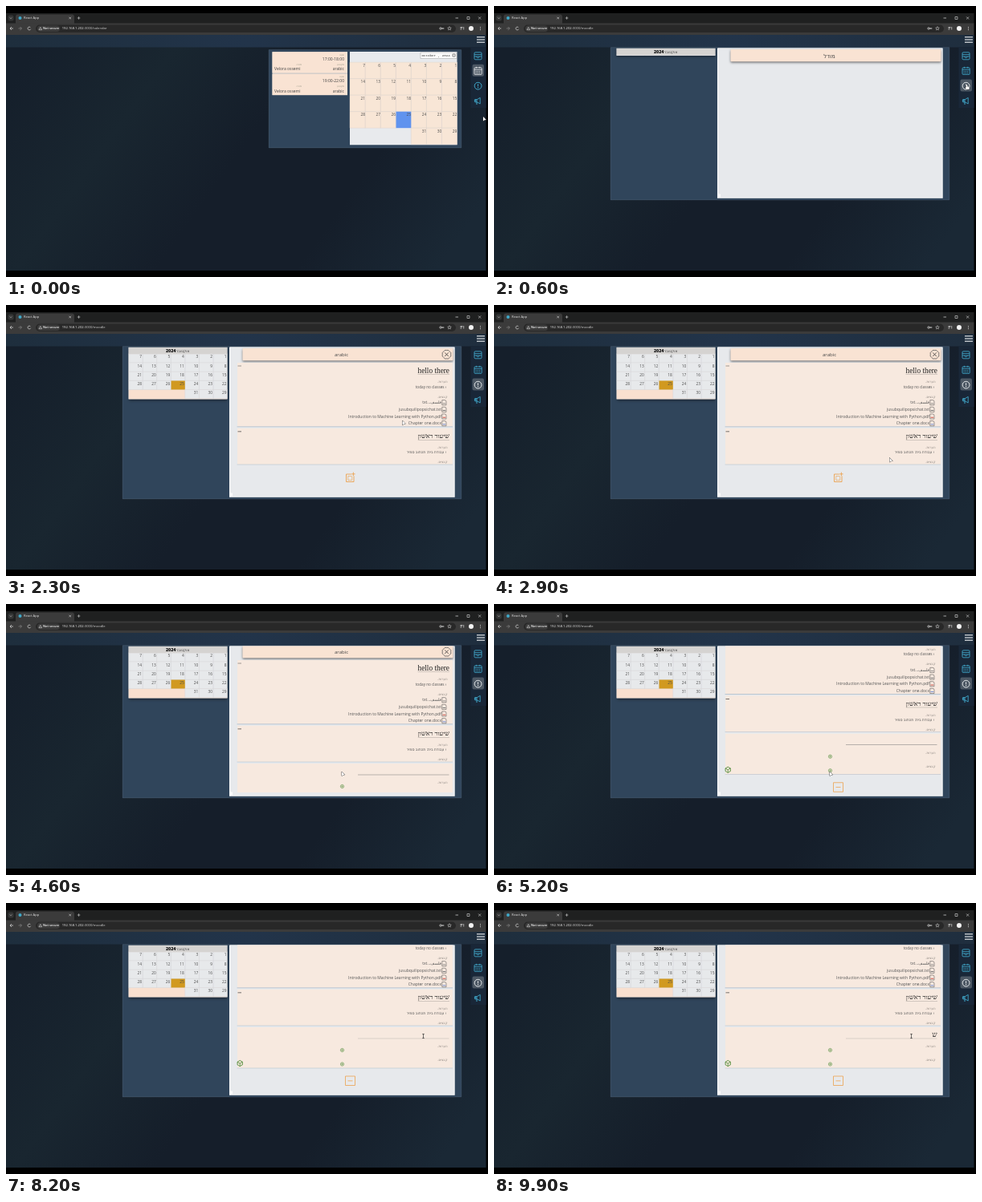
Write an HTML page with a canvas that moves like this. It is 600 px wide and 338 px high and loops after 10 s.

```html
<!DOCTYPE html>
<html lang="en">
<head>
<meta charset="utf-8">
<title>React App</title>
<style>
html, body { margin: 0; width: 100%; height: 100%; overflow: hidden; background: #000; }
canvas { display: block; width: 600px; height: 338px; }
</style>
</head>
<body>
<canvas id="stage"></canvas>
<script>
const W = 600, H = 338, LOOP = 10000, TAU = Math.PI * 2;
const canvas = document.getElementById('stage');
const ctx = canvas.getContext('2d');
const dpr = Math.max(1, window.devicePixelRatio || 1);
canvas.width = W * dpr;
canvas.height = H * dpr;

const SANS = '"Open Sans", "Noto Sans", "DejaVu Sans", sans-serif';
const SERIF = '"Liberation Serif", "Noto Serif", serif';
const MONO = '"Liberation Mono", "DejaVu Sans Mono", monospace';
const PERSON = 'Velora ossemi';
const INK = '#444', UI = '#ddd', RULE = '#a9bac9';
const PANEL = '#30455b', PANE = '#e7e9ec', PEACH = '#f9e3d3', CARD = '#f7e9df';
const CYAN = '#45b4d8', ORANGE = '#eda24e', GREEN = '#4c8a35';

// Times of the events
const OPEN_PAGE = 350, LOADED = 900, OPEN_COURSE = 1700, ADD = 3600, SCROLL = 4900, FOCUS = 6400, TYPE = 9000;

const ease = (t, from, time) => {
  const p = Math.min(1, Math.max(0, (t - from) / time));
  return p * p * (3 - 2 * p);
};

function rect(x, y, w, h, fill, r = 0) {
  ctx.fillStyle = fill;
  ctx.beginPath();
  ctx.roundRect(x, y, w, h, r);
  ctx.fill();
}

function stroke(color, lw) {
  ctx.strokeStyle = color;
  ctx.lineWidth = lw;
  ctx.stroke();
}

function box(x, y, w, h, color, lw = 0.8, r = 0) {
  ctx.beginPath();
  ctx.roundRect(x, y, w, h, r);
  stroke(color, lw);
}

const hline = (x, y, w, color, lw = 0.7) => rect(x, y - lw / 2, w, lw, color);
const vline = (x, y, h, color, lw = 0.7) => rect(x - lw / 2, y, lw, h, color);

function dot(x, y, r, color) {
  rect(x - r, y - r, 2 * r, 2 * r, color, r);
}

function ring(x, y, r, color, lw, from = 0, to = TAU) {
  ctx.beginPath();
  ctx.arc(x, y, r, from, to);
  stroke(color, lw);
}

// n spokes from the centre: crosses, plus signs and chevrons
function spokes(x, y, r, n, turn, color, lw = 0.6, step = TAU / n) {
  ctx.beginPath();
  for (let i = 0; i < n; i++) {
    const a = turn + i * step;
    ctx.moveTo(x, y);
    ctx.lineTo(x + r * Math.cos(a), y + r * Math.sin(a));
  }
  stroke(color, lw);
}

const plusSign = (x, y, r, color, lw) => spokes(x, y, r, 4, 0, color, lw);
const cross = (x, y, r, color, lw) => spokes(x, y, r, 4, TAU / 8, color, lw);

// Regular polygon; inner below 1 makes a star
function poly(x, y, r, n, turn, color, lw, inner = 1) {
  ctx.beginPath();
  for (let i = 0; i < 2 * n; i++) {
    const a = turn + i * Math.PI / n;
    const k = i % 2 ? inner * (inner < 1 ? 1 : Math.cos(Math.PI / n)) : 1;
    ctx.lineTo(x + r * k * Math.cos(a), y + r * k * Math.sin(a));
  }
  ctx.closePath();
  stroke(color, lw);
}

function text(str, x, y, size, color = INK, align = 'right', font = SANS, weight = 400) {
  ctx.font = `${weight} ${size}px ${font}`;
  ctx.direction = /[\u0590-\u06ff]/.test(str) ? 'rtl' : 'ltr';
  ctx.textAlign = align;
  ctx.textBaseline = 'alphabetic';
  ctx.fillStyle = color;
  ctx.fillText(str, x, y + size * 0.34);
  return ctx.measureText(str).width;
}

function shadowed(blur, dy, draw) {
  ctx.save();
  ctx.shadowColor = 'rgba(0,0,0,0.5)';
  ctx.shadowBlur = blur * dpr;
  ctx.shadowOffsetY = dy * dpr;
  draw();
  ctx.restore();
}

function clipped(x, y, w, h, draw) {
  ctx.save();
  ctx.beginPath();
  ctx.rect(x, y, w, h);
  ctx.clip();
  draw();
  ctx.restore();
}

function gradient(x0, y0, x1, y1, colors) {
  const g = ctx.createLinearGradient(x0, y0, x1, y1);
  colors.forEach((c, i) => g.addColorStop(i / (colors.length - 1), c));
  return g;
}

function arrow(x, dir, color) {
  hline(x - 2, 28, 4, color);
  spokes(x + 2 * dir, 28, 2.8, 2, (dir < 0 ? -1 : 3) * TAU / 8, color, 0.7, TAU / 4);
}

function browser(path) {
  rect(0, 9, 597.5, 13, '#1f2020');
  rect(2.5, 11.5, 7, 7, '#353636', 2);
  spokes(6, 15.7, 1.7, 2, -3 * TAU / 8, UI, 0.6, TAU / 4);
  rect(12, 10.5, 73, 12, '#3b3b3b', [3, 3, 0, 0]);
  dot(17.5, 15, 2, '#3fa9c9');
  text('React App', 22, 15, 4.1, '#e2e2e2', 'left');
  cross(79.7, 15, 1.8, UI);
  plusSign(90.6, 15, 1.8, UI);
  hline(559.5, 15, 3.5, UI);
  box(574, 13.5, 3, 3, UI, 0.6);
  cross(589.6, 15, 2.2, UI);

  rect(0, 21.5, 597.5, 14.5, '#3b3b3b');
  rect(37, 23.5, 523, 9.5, '#282828', 4.7);
  arrow(7, -1, UI);
  arrow(17.5, 1, '#888');
  ring(29, 28, 1.9, UI, 0.7, 0.4, 5.6);
  rect(39, 24.5, 28, 7.5, '#3c3c3c', 3.7);
  poly(42.8, 28.6, 2.1, 3, -TAU / 4, UI, 0.6);
  text('Not secure', 46, 28, 3.9, '#f0f0f0', 'left', SANS, 600);
  const host = text('192.168.1.202', 69.7, 28, 4.15, '#f2f2f2', 'left');
  text(':3000/' + path, 69.7 + host, 28, 4.15, '#cfcfcf', 'left');
  ring(541, 28, 1.2, UI, 0.7);
  hline(542, 28, 3.3, UI, 1);
  poly(552, 28, 2.4, 5, -TAU / 4, UI, 0.5, 0.45);
  for (let i = 0; i < 3; i++) {
    hline(565.5, 26.3 + 1.4 * i, 3 - 0.6 * i, UI);
    dot(590.5, 26.2 + 1.8 * i, 0.5, UI);
  }
  vline(569.8, 26, 3.4, UI);
  dot(579, 28, 3, '#f4f4f4');
}

const icons = [
  c => {
    box(583, 57.8, 9, 9, c, 0.8, 1.2);
    hline(583, 60.4, 9, c);
    hline(583, 62.9, 9, c);
    ring(587.5, 62.9, 1.7, c, 0.8, 0, Math.PI);
  },
  c => {
    box(583, 77, 9.2, 8.4, c, 0.8, 1);
    hline(583, 79.4, 9.2, c);
    for (const x of [585.3, 589.8]) vline(x, 75.8, 2, c);
    for (let i = 0; i < 6; i++) rect(584.7 + i % 3 * 2.2, 80.9 + (i > 2) * 2, 1.1, 1, c);
  },
  c => {
    ring(587.6, 99.7, 4.4, c, 0.9);
    vline(587.6, 97.3, 3, c, 0.9);
    dot(587.6, 101.7, 0.6, c);
  },
  c => {
    box(583.4, 116.5, 2.6, 3.4, c, 0.8, 0.6);
    poly(588, 118.2, 4.4, 3, Math.PI, c, 0.8);
    vline(586, 120, 3, c, 0.9);
  }
];

function sidebar(active) {
  rect(0, 36, 597.5, 15.5, gradient(0, 36, 597, 36, ['#1e2e3d', '#22344a', '#1f2e3e']));
  for (let i = 0; i < 3; i++) hline(586, 38.8 + 3.2 * i, 10, '#f3f5f6', 1.1);
  rect(578.5, 51.5, 19, 75.5, '#192738');
  rect(580.5, 54 + 18.7 * active, 14.5, 15, '#4d5864', 2);
  icons.forEach((draw, i) => draw(i === active ? '#f1f4f5' : CYAN));
}

// Days run right to left in rows of seven
function month(x, y, cw, ch, today, fill, edge, inset) {
  for (let d = 1; d <= 31; d++) {
    const cx = x + (6 - (d - 1) % 7) * cw, cy = y + Math.floor((d - 1) / 7) * ch;
    rect(cx, cy, cw, ch, d === 25 ? today : fill);
    if (d !== 25) box(cx, cy, cw, ch, edge, 0.4);
    text(String(d), cx + cw - inset, cy + 4, 4.8, '#4c4c4c');
  }
}

function panel(x, y, w, h) {
  rect(x, y, w, h, PANEL);
  box(x + 0.25, y + 0.25, w - 0.5, h - 0.5, '#4a5c6f', 0.5);
}

function calendarPage() {
  panel(327, 54.5, 240, 122.5);
  rect(331.5, 57.3, 93.5, 54, '#c9c8c7');
  ['17:00-18:00', '19:00-22:00'].forEach((hours, i) => {
    const y = 57.3 + 27.4 * i;
    rect(331.5, y, 93.5, 26.2, PEACH);
    text('שעה', 421, y + 3.2, 3, '#998');
    text(hours, 421, y + 9, 5);
    text('מורה', 368, y + 15.6, 3, '#998');
    text('מקצוע', 421, y + 15.6, 3, '#998');
    text(PERSON, 334, y + 21.3, 5, INK, 'left');
    text('arabic', 421, y + 21.3, 5);
  });
  rect(428, 57, 133.5, 116.3, '#e8eaed');
  rect(516, 58, 45, 7.5, '#fafafa');
  box(516, 58, 45, 7.5, '#888', 0.4);
  text('October , 2024', 517.5, 61.8, 4.2, '#333', 'left', MONO);
  box(556, 60, 3, 3, '#222', 0.5);
  month(428, 70.2, 133.5 / 7, 20.5, '#6093ee', '#f8e6d6', '#d9d0c8', 0.2);
}

function monthBox(open) {
  const h = 9 + 55.7 * open;
  shadowed(3.5, 1.2, () => rect(152.5, 52.8, 123, h, '#d8d8d8'));
  clipped(152.5, 52.8, 123, h, () => {
    rect(152.5, 105.5, 123, 12, '#f9e0cf');
    month(152.5, 60.8, 123 / 7, 11.2, '#d1991f', '#e7e9eb', '#d3d4d6', 1);
    rect(152.5, 52.8, 123, 8.4, '#d5d3d1');
  });
  text('2024', 199, 57, 5.3, '#111', 'left', SANS, 800);
  text('אוקטובר', 228.5, 57, 4.5);
}

function titleBar(str, size) {
  shadowed(3, 1.5, () => rect(294.5, 54, 262, 15.3, PEACH, 1));
  text(str, 417.5, 62.4, size, INK, 'center');
}

function courseList() {
  shadowed(4, 2, () => rect(283, 73, 275, 28.5, '#d6d6d6'));
  text('מקצוע', 554, 79, 2.8, '#888');
  text('arabic', 551.5, 86.3, 7.3, '#333');
  text('‹', 555, 86.3, 5, '#555');
  text('מורה', 554, 94.3, 2.8, '#888');
  text(PERSON, 554.5, 97.8, 4, '#555');
}

function cardBase(y, h) {
  rect(288, y, 268, h, CARD);
  hline(287.5, y + h, 268.5, RULE);
}

const label = (str, y) => text(str, 549.5, y, 4, '#8c8681');

function lesson(y, h, title, size, comment) {
  cardBase(y, h);
  hline(288.5, y + 4, 4.5, INK);
  const w = text(title, 552, y + 9.5, size, '#222', 'right', SERIF);
  hline(552 - w, y + 14.5, w, '#a9a29c', 0.4);
  label('הערות-', y + 23.8);
  text(comment, 545.5, y + 30, 4.7, '#555');
  text('‹', 548.3, y + 30, 4.7, '#555');
  label('קבצים-', y + 42.2);
}

function fileRow(name, y, color) {
  text(name, 542, y, 5, '#555');
  box(542.8, y - 3, 5.2, 6.2, INK, 0.5, [0, 2, 0, 0]);
  hline(543.5, y + 1.3, 3.8, color, 0.9);
}

function plusButton(y) {
  ring(418.5, y, 2.1, GREEN, 0.6);
  plusSign(418.5, y, 1.1, GREEN, 0.6);
}

function newLesson(t) {
  const h = 51 * ease(t, ADD, 300);
  cardBase(201, h);
  clipped(287, 200, 270, h + 1, () => {
    hline(438, 215, 113.5, t < FOCUS ? '#777' : '#bdb5ae', 0.6);
    if (t >= TYPE) text('ש', 551.5, 209.5, 9, '#222', 'right', SERIF);
    else if (t >= FOCUS && (t - FOCUS) % 1000 < 500) vline(551.3, 205, 10, '#999');
    ['הערות-', 'קבצים-'].forEach((str, i) => {
      label(str, 225 + 17 * i);
      plusButton(229.5 + 17.5 * i);
    });
    poly(291.2, 246, 3.6, 6, TAU / 4, GREEN, 0.9);
    spokes(291.2, 246, 3.6, 3, TAU / 4, GREEN, 0.8);
  });
  box(422.5, 211 + h, 12, 11.5, ORANGE);
  hline(425.5, 216.8 + h, 6, ORANGE, 0.8);
}

function addIcon() {
  box(423.5, 211, 9.5, 9.5, ORANGE, 0.9);
  box(425.7, 213.5, 5, 5, ORANGE, 0.6);
  rect(429.8, 208, 5.5, 5.3, PANE);
  plusSign(432.4, 210.8, 2.2, ORANGE, 0.9);
}

function course(t) {
  ctx.translate(0, -2 * ease(t, ADD, 300) - 44 * ease(t, SCROLL, 400));
  titleBar('arabic', 6);
  poly(548.5, 61.7, 5.7, 8, TAU / 16, '#555', 0.8);
  cross(548.5, 61.7, 3.2, '#333', 0.8);

  lesson(72, 79.8, 'hello there', 9.3, 'today no classes');
  ['פلسف', 'jusubquilipopsichat.txt', 'Introduction to Machine Learning with Python.pdf', 'Chapter one.docx']
    .forEach((name, i) => fileRow(i ? name : 'فلسف...txt', 121.6 + 8.65 * i, ['#777', '#777', '#d0564a', '#4a6fd0'][i]));
  lesson(153.8, 45.2, 'שיעור ראשון', 8.1, 'עבודת בית: תכתוב סמיר');

  if (t < ADD) addIcon();
  else newLesson(t);
}

function moodlePage(t) {
  panel(145, 51.5, 422, 190.5);
  monthBox(ease(t, LOADED, 200));
  rect(278, 52.5, 280.7, 187.3, '#fbfcfc');
  rect(279, 52.5, 278.7, 186.3, PANE);
  rect(279, 234.5, 3, 4, '#fbfbfb');
  clipped(279, 52.5, 278.7, 182.5, () => {
    if (t >= OPEN_COURSE) return course(t);
    titleBar('מודל', 7);
    if (t >= LOADED + 100) courseList();
  });
}

// Each stop is reached at a time after a glide of a given length
const stops = [
  { x: 588.5, y: 98, at: 300, time: 300 },
  { x: 495, y: 79, at: 1200, time: 500 },
  { x: 492.5, y: 190.5, at: 2700, time: 900 },
  { x: 427, y: 213, at: 3500, time: 500 },
  { x: 418, y: 209, at: 4400, time: 600 },
  { x: 519.5, y: 166, at: FOCUS, time: 900 }
];

function pointer(t) {
  let x = 594, y = 138;
  for (const s of stops) {
    const k = ease(t, s.at - s.time, s.time);
    x += (s.x - x) * k;
    y += (s.y - y) * k;
  }
  if (t >= FOCUS) {
    vline(x, y - 2.7, 5.4, '#333');
    for (const dy of [-2.7, 2.7]) hline(x - 1.3, y + dy, 2.6, '#333');
    return;
  }
  const links = [stops[0], stops[1], stops[3]];
  ctx.beginPath();
  if (links.some(s => Math.hypot(s.x - x, s.y - y) < 3)) {
    ctx.roundRect(x - 0.5, y, 1.3, 4, 0.6);
    ctx.roundRect(x - 1.3, y + 2.5, 4.4, 3.6, 1.2);
  } else {
    ctx.moveTo(x, y);
    ctx.lineTo(x, y + 5.4);
    ctx.lineTo(x + 1.6, y + 4.3);
    ctx.lineTo(x + 3.7, y + 3.9);
    ctx.closePath();
  }
  stroke('#333', 0.8);
  ctx.fillStyle = '#fff';
  ctx.fill();
}

function render(t) {
  const first = t < OPEN_PAGE;
  ctx.setTransform(dpr, 0, 0, dpr, 0, 0);
  rect(0, 0, W, H, '#000');
  rect(0, 36, 597.5, 294, gradient(60, 20, 520, 350, ['#151f2b', '#192630', '#151e2a', '#151e2a', '#1a2835']));
  browser(first ? 'calendar' : 'moodle');
  sidebar(first ? 1 : 2);
  if (first) calendarPage();
  else moodlePage(t);
  pointer(t);
}

const start = performance.now();
function tick() {
  render((performance.now() - start) % LOOP);
  requestAnimationFrame(tick);
}
tick();
</script>
</body>
</html>
```
